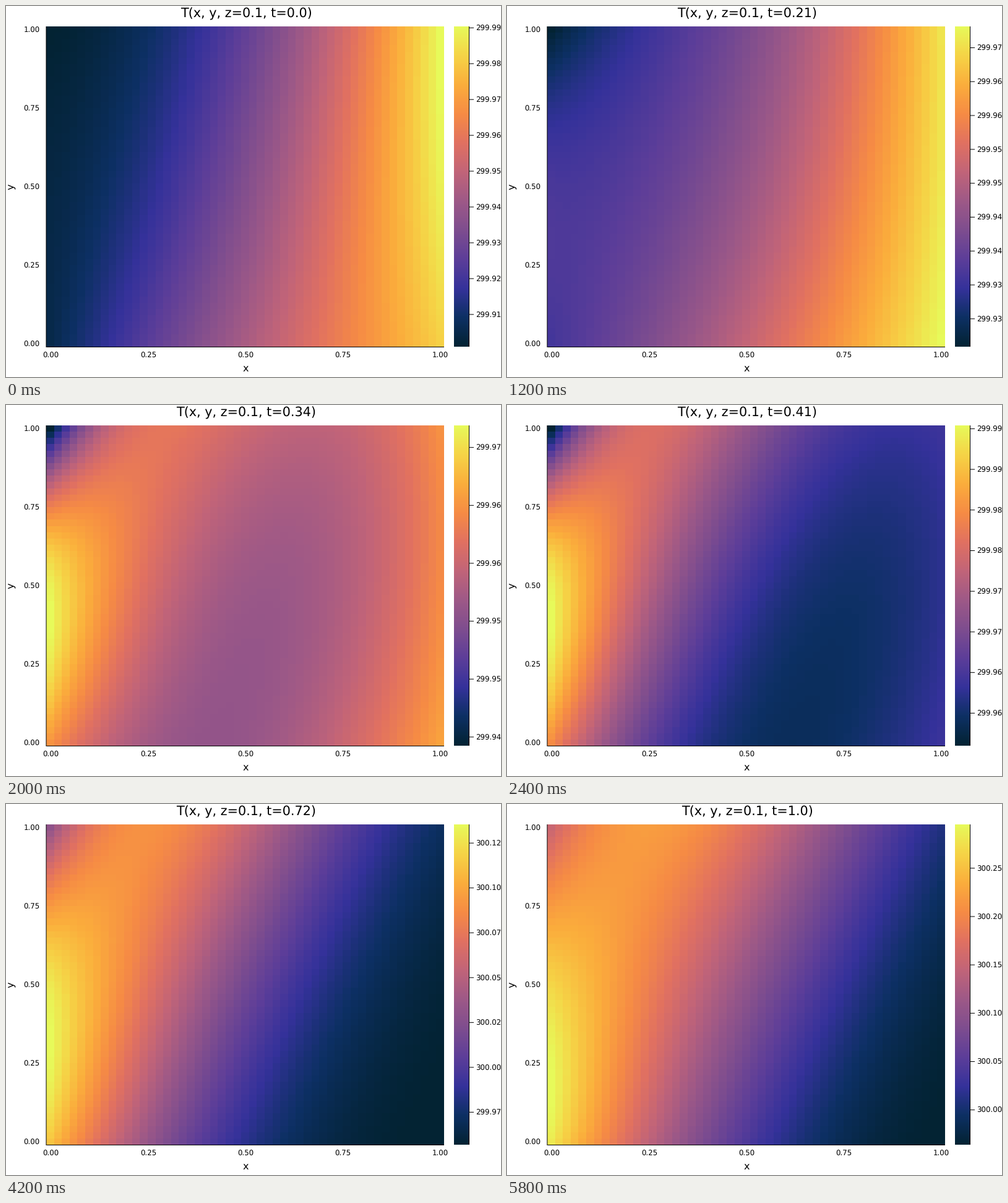
A matplotlib script that plays this animation: 800x600 px, repeating every 6 s.

```python
import numpy as np
import matplotlib.pyplot as plt
from matplotlib.animation import FuncAnimation
from matplotlib.colors import LinearSegmentedColormap

plt.rcParams.update({"font.family": "DejaVu Sans", "text.hinting": "none"})

FRAMES, INTERVAL = 30, 200
W, H, DPI = 800, 600, 100
LEFT, RIGHT, TOP, BOTTOM = 65.3, 708, 33, 551
BAR = (724, 748)
CELLS = 51
TITLE, GUIDE, TICK = 20.8, 16.1, 11.7

thermal = LinearSegmentedColormap.from_list("thermal", np.array([
    (3, 35, 51), (13, 48, 100), (53, 50, 155), (93, 62, 153),
    (126, 77, 143), (158, 89, 135), (193, 100, 121), (225, 113, 97),
    (246, 139, 69), (251, 173, 60), (246, 211, 70), (231, 250, 90)]) / 255)

x, y = np.meshgrid(*[np.linspace(0, 1, CELLS)] * 2)


def temperature(t):
    """A fading left-to-right slope and a hot spot growing at the left wall."""
    r = 1 - t
    slope = 80 * r**2.8 * (x**(1 + 0.9 * y) - 0.5)
    right_wall = (16 * r**10 - 7 * r**2) * x**2 * (y * (2 - y) - 0.4)
    cold_corner = (4 + 20 * t * r) * y**2 * (1 - x)**2

    plume = (1 - x + 0.38 * y)**(2 + 1.45 * r)
    notch = (1.3 + 1.2 * r) * y**(1.5 + 1.8 * r) * (1 - x)**(3.6 + 3 * r)
    heating = 318 * t**2.1 * (1 - r**3) * (plume - notch)

    mean = 45 + 19 * t**1.8
    return 299.9 + (mean + slope + right_wall - cold_corner + heating) / 1000


def ticks(low, high):
    power = 10.0 ** np.floor(np.log10(high - low))
    factor = (high - low) / power
    step = power * (1 if factor > 5 else 0.5 if factor > 2.5 else 0.25)
    nudge = 1e-9 if step < 0.01 else -1e-9
    for n in range(int(np.ceil(low / step)), int(np.floor(high / step)) + 1):
        yield n * step, f"{n * step + nudge:.2f}"


fig = plt.figure(figsize=(W / DPI, H / DPI), dpi=DPI, facecolor="white")
ax = fig.add_axes([0, 0, 1, 1])
ax.axis("off")


def label(px, py, text, size, **kw):
    kw = {"ha": "center", "va": "baseline", **kw}
    return ax.text(px, py, text, size=size * 72 / DPI, color="black", **kw)


def line(xs, ys):
    return ax.plot(xs, ys, color="black", lw=0.72, snap=False,
                   solid_capstyle="butt")[0]


def raster(data, left, right):
    return ax.imshow(data, cmap=thermal, origin="lower", aspect="auto",
                     extent=(left, right, BOTTOM, TOP),
                     interpolation="nearest")


heat = raster(temperature(0), LEFT, RIGHT)
raster(np.linspace(0, 1, 256)[:, None], *BAR)
ax.set(xlim=(0, W), ylim=(H, 0))

line([LEFT, RIGHT], [BOTTOM + 0.5] * 2)
line([LEFT - 0.3] * 2, [TOP, BOTTOM + 1])
line([BAR[1] + 0.5] * 2, [TOP, BOTTOM])
for v in np.linspace(0, 1, 5):
    label(72.6 + 629.5 * v, 568.9, f"{v:.2f}", TICK)
    label(54.9, 551 - 508 * v, f"{v:.2f}", TICK, ha="right")
label(387.5, 591, "x", GUIDE)
label(13.5, 292.5, "y", GUIDE, rotation=90, rotation_mode="anchor")
title = label(388, 18.6, "", TITLE)
marks = []


def draw(i):
    t = i / (FRAMES - 1)
    field = temperature(t)
    low, high = field.min(), field.max()
    heat.set_data(field)
    heat.set_clim(low, high)
    title.set_text(f"T(x, y, z=0.1, t={round(t, 2)})")
    while marks:
        marks.pop().remove()
    for value, text in ticks(low, high):
        py = BOTTOM - (BOTTOM - TOP) * (value - low) / (high - low)
        marks.append(line([BAR[1], BAR[1] + 8], [py, py]))
        marks.append(label(758.7, py + 4.6, text, TICK, ha="left"))
    return [heat, title, *marks]


anim = FuncAnimation(fig, draw, frames=FRAMES, interval=INTERVAL,
                     repeat=True, repeat_delay=0, blit=False)
plt.show()
```
